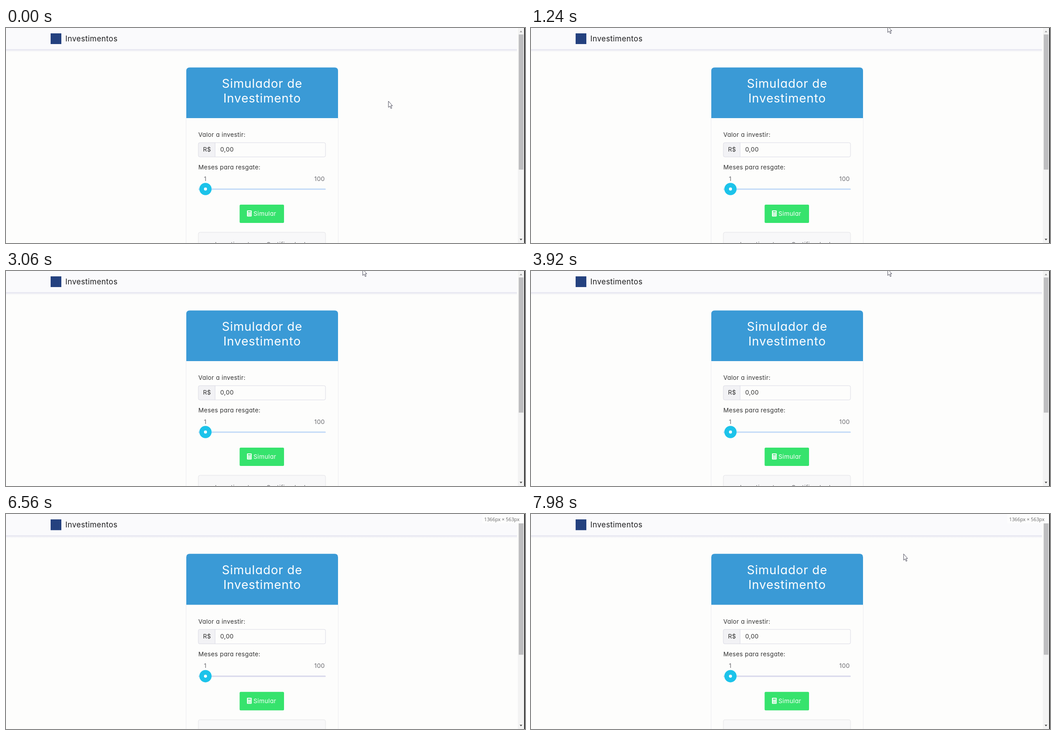
Write an HTML page that moves like this. It is 1163x482 px and loops after 8 s.

```html
<!DOCTYPE html>
<html lang="pt-BR">
<head>
<meta charset="utf-8">
<title>Simulador de Investimento</title>
<style>
  html, body { margin: 0; width: 100%; height: 100%; overflow: hidden; background: #fdfdfc; }
  svg { display: block; width: 1163px; height: 482px; }
  text {
    font: 13.6px Inter, sans-serif;
    font-feature-settings: "cv11";
    font-optical-sizing: none;
    letter-spacing: .025em;
    fill: #333;
  }
  .brand { font-size: 17px; fill: #1d1d1f; }
  .title { font-size: 27.2px; letter-spacing: .031em; fill: #fff; text-anchor: middle; }
  .muted { fill: #6b6b70; }
  .size { font: 10.8px "Open Sans", sans-serif; letter-spacing: 0; fill: #666; }
  .outline { fill: none; stroke: #dadae4; }
</style>
</head>
<body>
<svg viewBox="0 0 1163 482">
  <defs>
    <linearGradient id="shade" x2="0" y2="1">
      <stop stop-color="#e2e2ee"/>
      <stop offset="1" stop-color="#fdfdfc"/>
    </linearGradient>
  </defs>
  <rect width="1163" height="482" fill="#fdfdfc"/>

  <g id="page">
    <rect width="1145" height="48" fill="#fafafc"/>
    <rect y="47.5" width="1145" height="6" fill="url(#shade)"/>
    <rect x="100" y="12" width="24" height="24" fill="#24417f"/>
    <text class="brand" x="133" y="30">Investimentos</text>

    <path class="outline" d="M403.5 202V490M744.5 202V490" style="stroke:#ebebf0"/>
    <path d="M404 202V96q0-7.5 7.5-7.5H736.500q7.500 0 7.500 7.500V202Z" fill="#3a9ad6"/>
    <text class="title" x="574" y="134">Simulador de</text>
    <text class="title" x="574" y="166.500">Investimento</text>

    <text x="431" y="244">Valor a investir:</text>
    <path d="M469 257V289H434q-3 0-3-3V260q0-3 3-3Z" fill="#f2f2f5"/>
    <rect class="outline" x="431" y="257" width="285" height="32" rx="3.500"/>
    <path class="outline" d="M468.500 257V289"/>
    <text x="441.500" y="277">R$</text>
    <text x="480" y="277">0,00</text>

    <text x="431" y="317">Meses para resgate:</text>
    <text class="muted" x="446.500" y="342.500" text-anchor="middle">1</text>
    <text class="muted" x="714.500" y="342.500" text-anchor="end">100</text>
    <rect id="track" x="431" y="359.700" width="285.500" height="3" rx="1.500"/>
    <circle cx="447" cy="361" r="13.700" fill="#1cc3ea"/>
    <circle cx="447" cy="361" r="3.400" fill="#fff"/>

    <rect x="523.500" y="396" width="99.500" height="41" rx="2.500" fill="#36e36d"/>
    <rect x="540" y="409" width="10.500" height="13.500" rx="1.200" fill="#fff"/>
    <path d="M542 412.200H548.500" stroke="#36e36d" stroke-width="2.200"/>
    <path d="M542 416.300H549M542 419.600H549" stroke="#36e36d" stroke-width="1.500" stroke-dasharray="1.500 1"/>
    <text x="554.500" y="421" style="fill:#fff">Simular</text>

    <rect class="outline" x="431" y="458" width="285" height="60" rx="4" style="fill:#f8f8f9;stroke:#e3e3e6"/>
    <text class="muted" x="574" y="489.500" text-anchor="middle">Investimento em Certificado de</text>
  </g>

  <rect x="1147" width="14" height="482" fill="#f3f3f3"/>
  <path d="M1151 9.500L1154 6L1157 9.500Z" fill="#9a9a9a"/>
  <path d="M1151 472.500L1154 476L1157 472.500Z" fill="#444"/>
  <rect id="thumb" x="1149" width="10.500" fill="#bebec0"/>
  <g id="sizeLabel">
    <rect x="1067" width="94" height="21" fill="#fdfdfd"/>
    <text class="size" x="1071.500" y="15.500">1366px × 563px</text>
  </g>
  <rect x="1161" width="2" height="482" fill="#2b2b2b"/>

  <path id="cursor" d="M0 0V14L3.200 11.200L5.500 16.500L7.600 15.600L5.300 10.400H9Z"
        fill="#fff" stroke="#333345" stroke-width=".9" stroke-linejoin="round"/>
</svg>

<script>
const LOOP = 8000, RESIZE_AT = 6280, RETURN_AT = 7820;
const [page, track, thumb, sizeLabel, cursor] =
  ["page", "track", "thumb", "sizeLabel", "cursor"].map(id => document.getElementById(id));

// Cursor path as [time, x, y]
const leaving = [[120, 857, 164], [500, 831, 64], [860, 801, 0], [960, 799.5, -4]];
const returning = [[RETURN_AT, 802, -4], [7980, 835, 89.5]];

function along(path, time) {
  if (time <= path[0][0]) return path[0].slice(1);
  const next = path.findIndex(point => point[0] > time);
  if (next < 0) return path.at(-1).slice(1);
  const [t0, x0, y0] = path[next - 1], [t1, x1, y1] = path[next];
  const p = (time - t0) / (t1 - t0);
  return [x0 + (x1 - x0) * p, y0 + (y1 - y0) * p];
}

function draw(time) {
  const resized = time >= RESIZE_AT;
  page.setAttribute("transform", `scale(1 ${resized ? 1.0072 : 1})`);
  track.setAttribute("fill", resized ? "#d8d8ec" : "#c3daf7");
  thumb.setAttribute("y", resized ? 21 : 14.5);
  thumb.setAttribute("height", resized ? 294.5 : 303);
  sizeLabel.style.display = resized ? "" : "none";

  const [x, y] = along(resized ? returning : leaving, time);
  cursor.style.display = resized && time < RETURN_AT ? "none" : "";
  cursor.setAttribute("transform", `translate(${x} ${y})`);
}

function tick() {
  draw(performance.now() % LOOP);
  requestAnimationFrame(tick);
}
tick();
</script>
</body>
</html>
```
